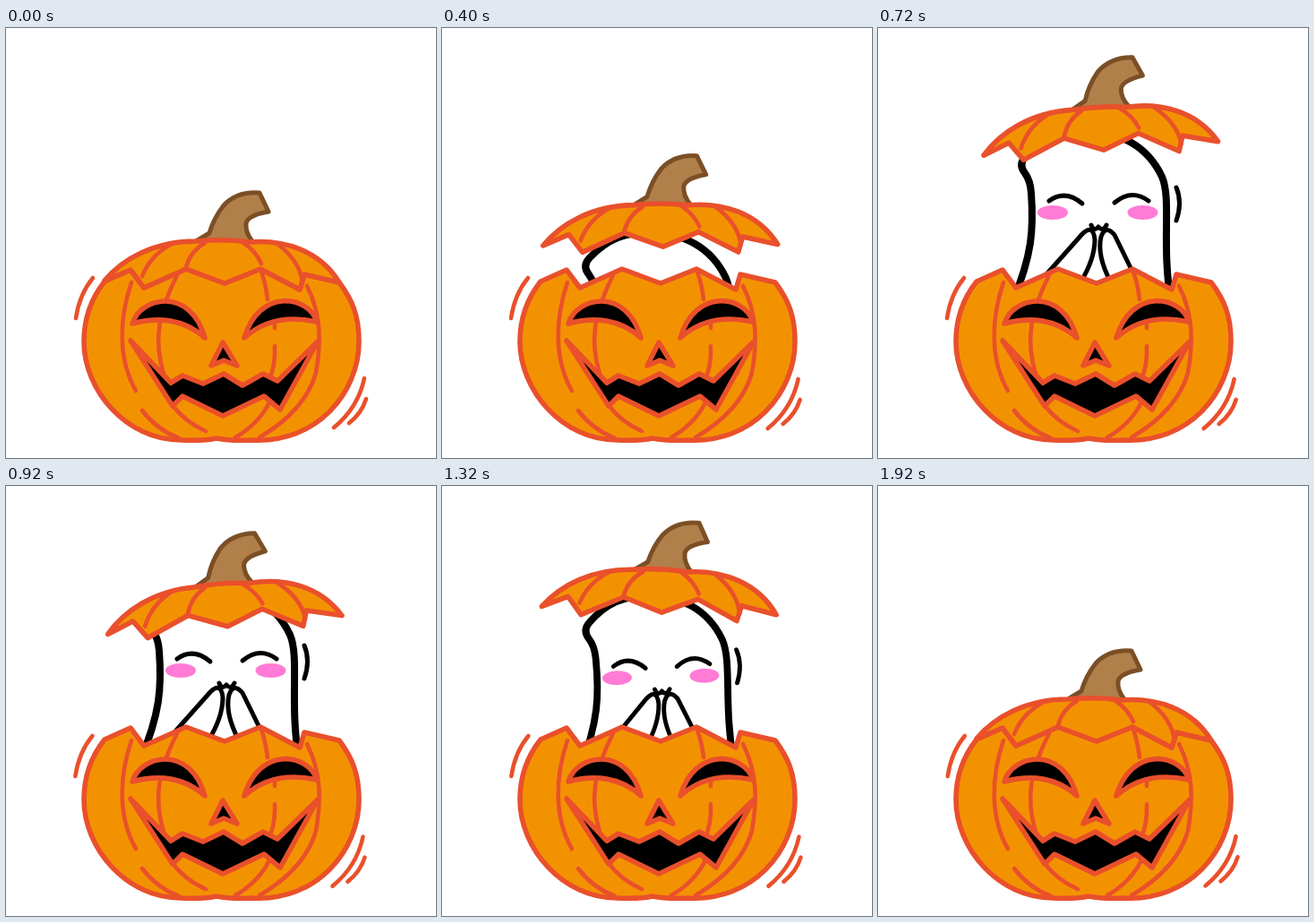
Animation, 480 px wide and 480 px high, one loop 1960 ms. Source, as an HTML page:

```html
<!DOCTYPE html>
<html lang="en">
<head>
<meta charset="utf-8">
<title>Pumpkin ghost</title>
<style>
  html, body { margin: 0; width: 100%; height: 100%; overflow: hidden; background: #fff; }
  svg { display: block; width: 100vw; height: 100vh; }
  path { stroke-linecap: round; stroke-linejoin: round; }
  .skin { fill: #f39200; stroke: #e9502b; stroke-width: 5.6; }
  .rib { fill: none; stroke: #e9502b; stroke-width: 4.6; }
  .hole { fill: #000; stroke: #e9502b; stroke-width: 5.6; }
  .ink { fill: none; stroke: #000; stroke-width: 5; }
</style>
</head>
<body>
<svg viewBox="0 0 480 480">
  <g id="ghost">
    <path d="M150 306C172 254 174 225 171 184Q170 170 164 162Q156 152 165 143C185 122 205 115 230 115C270 115 301 132 317 166C328 192 316 240 327 306"
      fill="#fff" stroke="#000" stroke-width="8"/>
    <g fill="#ff7bd5">
      <ellipse cx="195" cy="206" rx="17" ry="8"/>
      <ellipse cx="295.500" cy="206" rx="17" ry="8"/>
    </g>
    <path class="ink" d="M191 193Q209 180 228 196M264 195Q283 179 302 193"/>
    <path class="ink" d="M333 178Q340 195 333 215" stroke-width="6"/>
    <path class="ink" d="M238 220Q241 228 246 222Q251 228 255 220"/>
    <path class="ink" d="M180 284L228 230Q240 218 242 236Q242 258 226 284M290 284L264 231Q254 219 249 233Q244 254 260 284"/>
  </g>
  <g id="body">
    <path class="skin" d="M110 283C95 302 87 325 87 350C87 405 135 460 195 460Q222 461 235 458Q250 461 275 460C347 464 394 407 394 350C394 320 386 303 372 284L333 275L328 292L284 269L244 285L201 269L154 290L139 270Z"/>
    <path class="rib" d="M140 284C126 325 125 370 145 405M191 276C169 320 165 350 176 386M152 427Q168 448 193 458M185 420Q200 440 223 450M285 272Q290 286 292 303M300 326V335M300 355Q301 378 293 394M294 418Q282 442 256 457M336 288C352 320 352 350 346 385Q334 427 283 457"/>
    <path class="hole" d="M141 330C150 300 206 288 222 346C200 325 170 322 141 330ZM347 328C338 298 282 290 266 346C288 326 315 321 347 328Z"/>
    <path class="hole" d="M242 351L229 377L243 371L258 377Z"/>
    <path class="hole" d="M139 349L186 422L197 411L242 433L288 411L306 426L348 350L303 394L287 386L264 399L243 386L220 397L197 388L184 396Z"/>
  </g>
  <g id="lid">
    <path d="M212 238L227 229Q232 212 243 198Q258 182 283 184L293 205Q270 209 268 218Q267 228 275 238"
      fill="#b17f4a" stroke="#7b4f26" stroke-width="5"/>
    <path class="skin" d="M110 282C130 258 165 238 212 238Q242 235 272 239C310 236 350 248 372 284L333 275L328 292L284 269L244 285L201 269L154 290L139 270Z"/>
    <path class="rib" d="M185 241Q161 254 152 277M222 240Q206 249 201 267M264 239Q279 249 285 263M303 241Q328 260 331 284"/>
  </g>
  <path id="left" class="rib" d="M97 279Q82 297 78 324"/>
  <path id="right" class="rib" d="M400 391Q393 424 366 446M402 414Q397 430 383 441"/>
</svg>
<script>
const LOOP = 1960, STEP = 40, SHAKE = 400;

// Poses: time, x, y, angle, width
const lidKeys = [[320, 0, 0, 0], [560, 9.4, -164, -3], [920, 1, -129.4, -5], [1320, 2, -143.4, 1.6], [1480, 0, 0, 0]];
const ghostKeys = [[320, 0, 160, 0, 1], [540, 0, 0, 0, 1], [1200, 0, 0, 0, 1], [1320, -1, 7, -1.5, 0.97], [1480, 0, 160, 0, 1]];

function pose(keys, t) {
  const i = keys.findIndex(k => k[0] > t);
  if (i < 1) return keys[0].slice(1);
  const a = keys[i - 1], b = keys[i];
  const p = (1 - Math.cos(Math.PI * (t - a[0]) / (b[0] - a[0]))) / 2;
  return a.slice(1).map((v, n) => v + (b[n + 1] - v) * p);
}

function place(id, cx, cy, x, y, angle = 0, width = 1) {
  document.getElementById(id).setAttribute('transform',
    `translate(${x + cx} ${y + cy}) rotate(${angle}) scale(${width} 1) translate(${-cx} ${-cy})`);
}

// Side-to-side shaking before the jump and after the lid closes
function shake(t) {
  const start = t < SHAKE ? 0 : 1520;
  const s = t - start;
  return s > 0 && s < SHAKE ? Math.sin(2 * Math.PI * s / SHAKE) : 0;
}

function draw(now) {
  const t = Math.floor(now % LOOP / STEP) * STEP;
  const s = shake(t), [x, y, a] = pose(lidKeys, t);
  const sway = (1 - Math.cos(2 * Math.PI * t / 280)) / 2;
  const closed = y > -1 ? s : 0;
  place('body', 240, 345, 0, 0, 1.4 * s);
  place('lid', 258, 257, x - 1.7 * closed, y - Math.abs(closed), a - 2.6 * closed);
  place('ghost', 245, 206, ...pose(ghostKeys, t));
  document.getElementById('ghost').style.display = t > 320 && t < 1480 ? '' : 'none';
  place('left', 0, 0, -sway, 0);
  place('right', 0, 0, -2.5 * sway, sway);
  requestAnimationFrame(draw);
}
draw(0);
</script>
</body>
</html>
```
